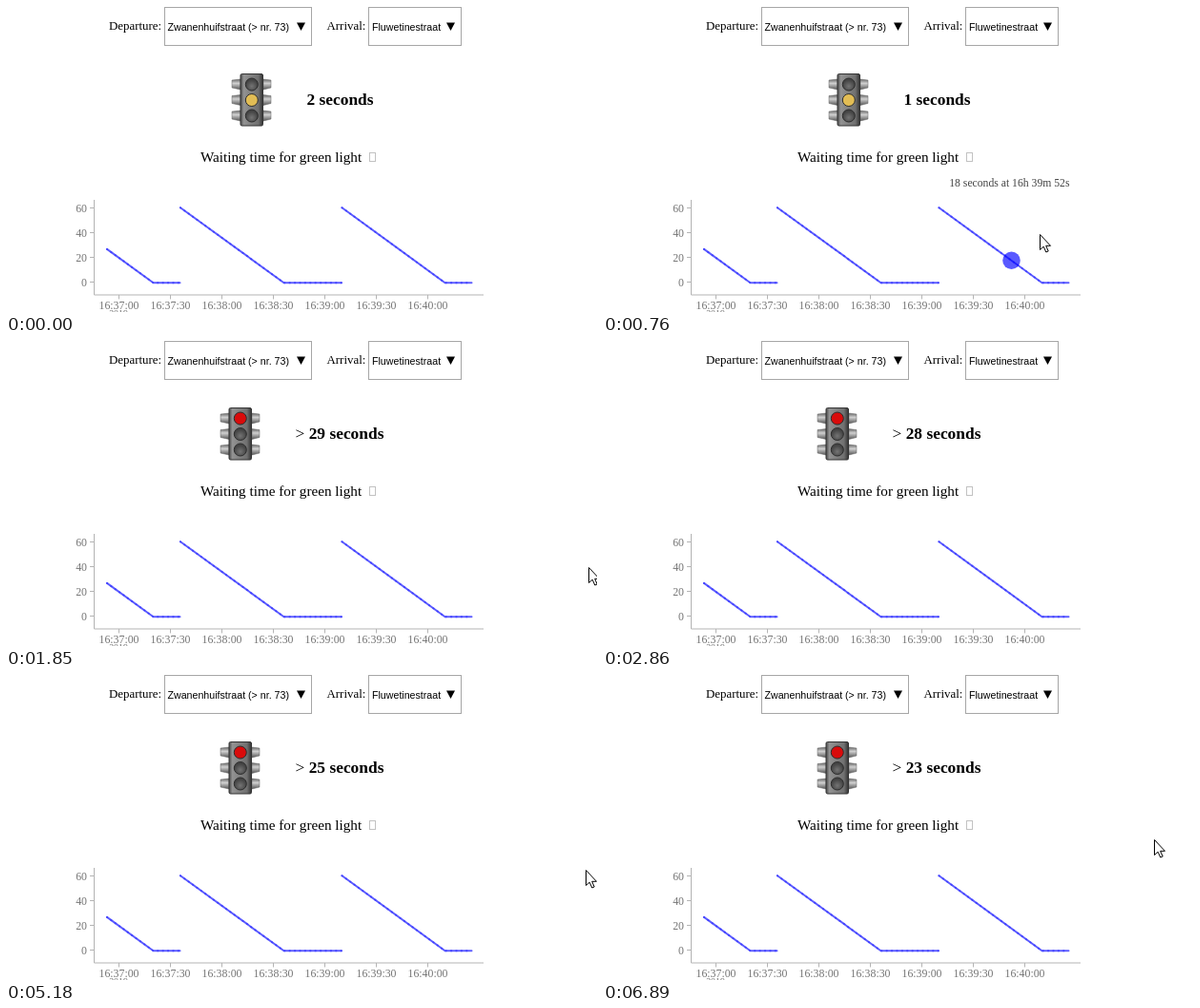
Write an HTML page that moves like this. It is 620 px wide and 322 px high and loops after 8 s.

```html
<!DOCTYPE html>
<html lang="en">
<head>
<meta charset="utf-8">
<title>Waiting time for green light</title>
<style>
  html, body { margin: 0; width: 100%; height: 100%; overflow: hidden; background: #fff; }
  svg { display: block; width: 620px; height: 322px; font-family: "Liberation Serif", Times, serif; }
  .label { font-size: 12.9px; }
  .option { font: 10.65px "Liberation Sans", Arial, sans-serif; }
  .select { fill: #fff; stroke: #a6a6a6; }
  .wait { font-size: 17.4px; white-space: pre; }
  .wait tspan { font-weight: bold; }
  .caption { font-size: 15.2px; }
  .chart { font-size: 11.8px; fill: #757575; }
  .axis { fill: none; stroke: #b4b4b4; }
  .line { fill: none; stroke: #00f; stroke-opacity: .64; stroke-width: 2; stroke-linecap: round; stroke-linejoin: round; }
  .dots { fill: none; stroke: #00f; stroke-opacity: .3; stroke-width: 2.4; stroke-linecap: round; stroke-dasharray: 0 5.4; }
  #note { font-size: 11.7px; fill: #444; text-anchor: end; }
</style>
</head>
<body>
<svg viewBox="0 0 620 322">
  <defs>
    <linearGradient id="body">
      <stop offset="0" stop-color="#4c4c4c"/>
      <stop offset=".15" stop-color="#929292"/>
      <stop offset=".8" stop-color="#707070"/>
      <stop offset="1" stop-color="#333"/>
    </linearGradient>
    <linearGradient id="hood" x2="0" y2="1">
      <stop offset="0" stop-color="#666"/>
      <stop offset=".4" stop-color="#d0d0d0"/>
      <stop offset="1" stop-color="#555"/>
    </linearGradient>
    <radialGradient id="off" cy=".65">
      <stop offset="0" stop-color="#747474"/>
      <stop offset="1" stop-color="#444"/>
    </radialGradient>
  </defs>

  <text class="label" x="108" y="25">Departure:</text>
  <rect class="select" x="166.5" y="1.5" width="154" height="40"/>
  <text class="option" x="169.5" y="26">Zwanenhuifstraat (&gt; nr. 73)</text>
  <path d="M305 17.5h9l-4.5 8.5z"/>
  <text class="label" x="336.5" y="25">Arrival:</text>
  <rect class="select" x="380.5" y="1.5" width="97" height="40"/>
  <text class="option" x="384" y="26">Fluwetinestraat</text>
  <path d="M462 17.5h9l-4.5 8.5z"/>

  <g id="light">
    <g id="hoods" fill="url(#hood)" stroke="#666" stroke-width=".5"></g>
    <rect x="246" y="71.5" width="23.5" height="54.5" rx="1.5" fill="url(#body)" stroke="#333"/>
    <g id="lamps" stroke="#2c2c2c"></g>
  </g>
  <text class="wait" id="wait" y="104"></text>

  <text class="caption" x="204" y="164">Waiting time for green light</text>
  <rect x="381.5" y="154.5" width="6" height="9" fill="none" stroke="#c2c2c2"/>

  <g class="chart">
    <path class="axis" d="M92.5 204V304H501"/>
    <g id="ticks"></g>
    <text x="118" y="327" font-size="9.8" text-anchor="middle">2019</text>
  </g>
  <path class="line" id="line"/>
  <path class="dots" id="dots"/>
  <circle id="blip" cx="483" cy="291.5" r="1.3" fill="#00f" fill-opacity=".35"/>
  <circle id="spot" r="9.3" fill="#00f" fill-opacity=".65"/>
  <text id="note" x="489.5" y="190"></text>

  <path id="cursor" d="M.5 .5V16.5L4.2 13.2 6.8 19 9.2 18 6.7 12.3H11.5Z" fill="#fff" stroke="#000" stroke-linejoin="round"/>
</svg>
<script>
  const LOOP = 8000;
  const $ = id => document.getElementById(id);
  const yOf = value => 291.2 - value * 1.31;
  const add = (parent, html) => $(parent).insertAdjacentHTML('beforeend', html);
  const show = (el, on) => el.style.display = on ? '' : 'none';

  // Each run: start, its seconds left, first zero, end.
  const runs = [[106, 27, 154.5, 182.5], [183, 60.3, 291.5, 352], [352.5, 60.3, 460.5, 488.5]];
  const path = runs.map(([a, v, z, b]) => `M${a} ${yOf(v)}L${z} ${yOf(0)}H${b}`).join('');
  $('line').setAttribute('d', path);
  $('dots').setAttribute('d', path);

  for (let v = 0; v <= 60; v += 20) {
    const y = Math.round(yOf(v)) - .5;
    add('ticks', `<path class="axis" d="M88 ${y}h4.5"/><text x="85" y="${y + 4.5}" text-anchor="end">${v}</text>`);
  }
  for (let i = 0; i < 7; i++) {
    const x = 118.5 + i * 54, min = 37 + (i >> 1), sec = i % 2 ? '30' : '00';
    add('ticks', `<path class="axis" d="M${x} 304v4.5"/><text x="${x}" y="319" text-anchor="middle">16:${min}:${sec}</text>`);
  }
  for (const y of [82.5, 99, 115.5]) {
    add('hoods', `<path d="M246 ${y - 5.5}l-9 1v8l9 2zM270 ${y - 5.5}l8 1v8l-8 2z"/>`);
    add('lamps', `<circle cx="257.8" cy="${y}" r="6.5"/>`);
  }
  const lamps = $('lamps').children;

  const counts = [[0, 2], [140, 1], [1150, 0], [1850, 29], [2460, 28], [3010, 27],
    [4100, 26], [5180, 25], [6190, 24], [6820, 23]];

  // Pointer: time, x, y; a bare time hides it.
  const moves = [[0], [220, 532, 253], [300, 530, 248], [380, 528, 246],
    [530, 516, 245], [600, 500, 244], [680, 480, 242], [760, 458, 240], [840, 463, 241], [920, 476, 241],
    [1150, 550, 240], [1220, 592, 239], [1300, 611, 239], [1920, 617, 238], [2000],
    [4170, 616, 210], [4250, 612, 208], [4330, 609, 207], [4400, 608, 206],
    [5960, 605, 204], [6040, 605, 194], [6190, 600, 189], [6270, 591, 182], [6340, 582, 176], [6420, 578, 174]];

  const at = (list, t) => list.findLast(step => step[0] <= t);

  function drawHover(x) {
    const [a, v, z] = runs[2];
    const value = Math.max(0, v * (z - x) / (z - a));
    const sec = 39 * 60 + 60 + Math.round((x - 442.5) * 30 / 54);
    const two = n => String(n).padStart(2, '0');
    $('spot').setAttribute('cx', x);
    $('spot').setAttribute('cy', yOf(value));
    $('note').textContent = `${Math.round(value)} seconds at 16h ${Math.floor(sec / 60)}m ${two(sec % 60)}s`;
  }

  function draw(t) {
    const count = at(counts, t)[1];
    const red = t >= 1850;
    $('light').setAttribute('transform', `translate(${red ? -12 : 0} 0)`);
    lamps[0].setAttribute('fill', red ? '#d90b0b' : 'url(#off)');
    lamps[1].setAttribute('fill', red ? 'url(#off)' : '#e2bd55');
    lamps[2].setAttribute('fill', 'url(#off)');
    $('wait').setAttribute('x', red ? 303.5 : 315.5);
    $('wait').innerHTML = `${red ? '&gt; ' : ''}<tspan>${count} seconds</tspan>`;

    const [, x, y] = at(moves, t);
    show($('cursor'), x !== undefined);
    if (x !== undefined) $('cursor').setAttribute('transform', `translate(${x} ${y})`);

    const hover = t >= 530 && t < 1150;
    show($('spot'), hover);
    show($('note'), hover);
    if (hover) drawHover(x - 29.5);
    show($('blip'), t >= 2320 && t < 2860 || t >= 6270 && t < 6890);
  }

  function tick() {
    draw(performance.now() % LOOP);
    requestAnimationFrame(tick);
  }
  tick();
</script>
</body>
</html>
```
